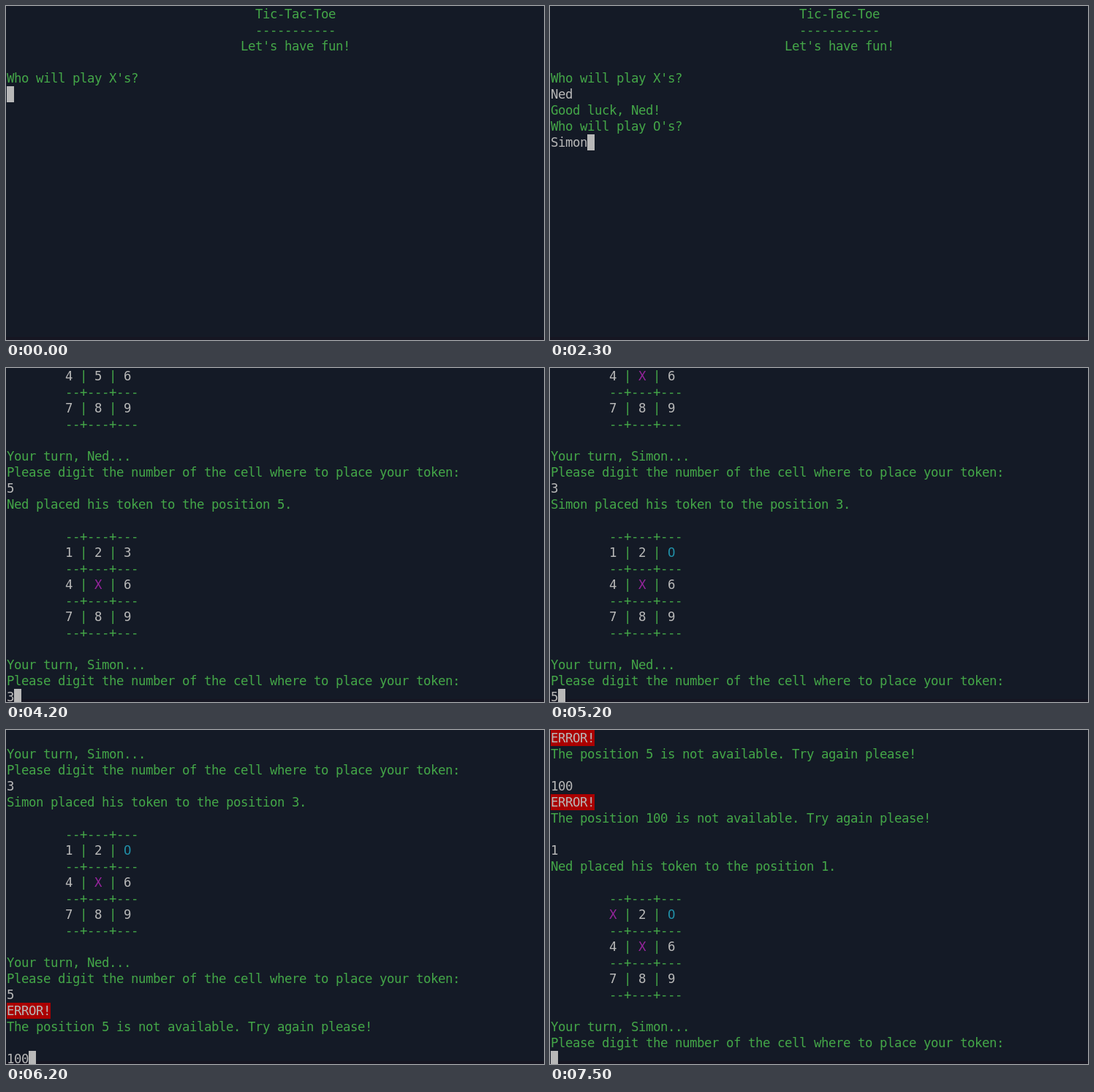
Animation of 736x458 px, one loop 8 s. Source, as an HTML page:

```html
<!DOCTYPE html>
<html lang="en">
<head>
<meta charset="utf-8">
<title>Tic-Tac-Toe</title>
<style>
  html, body { margin: 0; width: 100%; height: 100%; overflow: hidden; background: #141a26; }
  #screen {
    position: absolute; left: 0; top: 0; width: 735px; height: 458px;
    margin: 0; padding-left: 1px; overflow: hidden;
    background: linear-gradient(#141a26 454px, #161622 454px);
    font: 17.333px/22px "DejaVu Sans Mono", monospace;
    letter-spacing: calc(10px - 1ch);
    font-variant-ligatures: none;
    color: #44a748;
  }
  .row { height: 22px; white-space: pre; }
  .typed { color: #b8b8b8; }
  .x { color: #95249c; }
  .o { color: #2090a8; }
  .error, .cursor { display: inline-block; height: 22px; vertical-align: top; }
  .error { background: #aa0000; color: #b8b8b8; }
  .cursor { width: 10px; background: #b8b8b8; }
</style>
</head>
<body>
<div id="screen"></div>
<script>
const LOOP = 8000, ROWS = 21;
const players = { X: "Ned", O: "Simon" };

// [time, key]; "\n" is Enter
const keys = [
  [400, "N"], [800, "e"], [900, "d"], [1200, "\n"],
  [1600, "S"], [1800, "i"], [2100, "m"], [2200, "o"], [2300, "n"], [3000, "\n"],
  [3700, "5"], [3800, "\n"],
  [4200, "3"], [4700, "\n"],
  [5200, "5"], [5400, "\n"],
  [5800, "1"], [6100, "0"], [6200, "0"], [6600, "\n"],
  [7200, "1"], [7500, "\n"]
];

const tag = (cls, text) => `<span class="${cls}">${text}</span>`;
const pad = (n, text) => " ".repeat(n) + text;

const cells = [..."123456789"];
const lines = [
  pad(34, "Tic-Tac-Toe"), pad(34, "-".repeat(11)), pad(32, "Let's have fun!"),
  "", "Who will play X's?"
];
let input = "", entries = 0, turn = "X";

function askMove() {
  const rule = pad(8, "--+---+---");
  const cell = c => tag(c === "X" ? "x" : c === "O" ? "o" : "typed", c);
  lines.push("", rule);
  for (let i = 0; i < 9; i += 3)
    lines.push(pad(8, cells.slice(i, i + 3).map(cell).join(" | ")), rule);
  lines.push("", `Your turn, ${players[turn]}...`,
    "Please digit the number of the cell where to place your token:");
}

function enter(text) {
  lines.push(tag("typed", text));
  entries++;
  if (entries <= 2) {
    lines.push(`Good luck, ${text}!`);
    if (entries === 1) lines.push("Who will play O's?");
    else askMove();
  } else if (cells[text - 1] === text) {
    cells[text - 1] = turn;
    lines.push(`${players[turn]} placed his token to the position ${text}.`);
    turn = turn === "X" ? "O" : "X";
    askMove();
  } else {
    lines.push(tag("error", "ERROR!"),
      `The position ${text} is not available. Try again please!`, "");
  }
}

function snapshot() {
  const prompt = tag("typed", input) + tag("cursor", "");
  return [...lines, prompt].slice(-ROWS)
    .map(line => `<div class="row">${line}</div>`).join("");
}

const steps = [{ at: 0, html: snapshot() }];
for (const [at, key] of keys) {
  if (key === "\n") {
    enter(input);
    input = "";
  } else input += key;
  steps.push({ at, html: snapshot() });
}

const screen = document.getElementById("screen");
const start = performance.now();
let shown;

function draw(now) {
  const t = Math.max(0, now - start) % LOOP;
  const step = steps.findLast(s => s.at <= t);
  if (step !== shown) {
    screen.innerHTML = step.html;
    shown = step;
  }
  requestAnimationFrame(draw);
}
draw(start);
</script>
</body>
</html>
```
